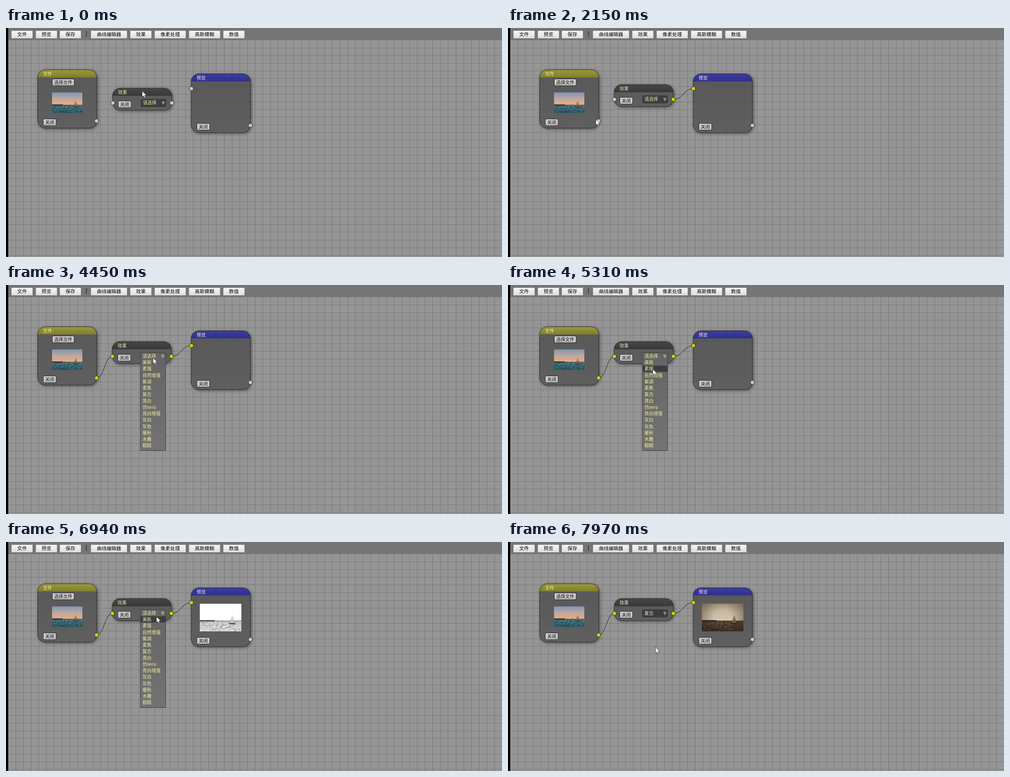
These frames come from a looping animation (1098x510 px, 8 s). An HTML page with a canvas:

```html
<!DOCTYPE html>
<html lang="zh">
<head>
<meta charset="utf-8">
<title>节点编辑器</title>
<style>
html, body { margin: 0; width: 100%; height: 100%; overflow: hidden; background: #959595; }
canvas { display: block; }
</style>
</head>
<body>
<canvas id="stage" width="1098" height="510"></canvas>
<script>
const ctx = document.getElementById('stage').getContext('2d');
const FONT = '"Noto Sans Mono CJK SC", "Noto Sans CJK SC", "Noto Sans CJK", sans-serif';
const LOOP = 8000;
const GRID = 17.1;
const ROW = 14.25;
const STEP = 145;
const OPTIONS = ['请选择', '美肤', '素描', '自然增强', '紫调', '柔焦', '复古', '黑白',
  '仿neru', '亮白增强', '灰白', '灰色', '暖秋', '木雕', '粗糙'];

// Pointer moves: start time, end time, destination.
const HOME = [301, 140];
const DRAG_END = 400;
const MOVES = [
  [130, DRAG_END, 300, 132], [540, 810, 383, 179], [950, 1090, 364, 158],
  [1210, 1480, 408, 136], [1880, 2150, 194, 203], [2270, 2420, 197, 206],
  [2700, 3610, 235, 159], [3890, 4310, 325, 162], [4890, 5310, 320, 187],
  [5960, 6200, 335, 157], [6940, 7450, 312, 242], [7720, 7970, 326, 234]
];

const LOOKS = {
  colour: { sky: ['#8196b4', '#bda9a0', '#ebab7c'], sea: ['#437480', '#24505c'],
    land: '#37363c', sail: '#75604f', waves: ['#173c4c', '#6f9598'], shade: 0 },
  sketch: { sky: ['#fff', '#fff'], sea: ['#c4c4c4', '#dcdcdc'],
    land: '#4a4a4a', sail: '#c2c2c2', waves: ['#666', '#fff'], shade: 0 },
  sepia: { sky: ['#b3a28c', '#cbbba4', '#d3c4ae'], sea: ['#564636', '#3a2e22'],
    land: '#30261d', sail: '#7a6752', waves: ['#241b13', '#857159'], shade: .45 }
};

function vertical(y, h, stops) {
  const g = ctx.createLinearGradient(0, y, 0, y + h);
  stops.forEach((c, i) => g.addColorStop(i / (stops.length - 1), c));
  return g;
}

function rect(x, y, w, h, fill) {
  ctx.fillStyle = fill;
  ctx.fillRect(x, y, w, h);
}

function stroke(colour, width = 1) {
  ctx.strokeStyle = colour;
  ctx.lineWidth = width;
  ctx.stroke();
}

function box(x, y, w, h, r, fill, border) {
  ctx.beginPath();
  ctx.roundRect(x, y, w, h, r);
  ctx.fillStyle = fill;
  ctx.fill();
  if (border) stroke(border);
}

function polygon(points, fill) {
  ctx.beginPath();
  points.forEach(p => ctx.lineTo(...p));
  ctx.closePath();
  ctx.fillStyle = fill;
  ctx.fill();
}

function text(str, x, midY, colour, align = 'left', size = 10) {
  ctx.font = `${size}px ${FONT}`;
  ctx.textAlign = align;
  ctx.fillStyle = colour;
  ctx.fillText(str, x, midY + size * .38);
}

function button(str, x, y) {
  const w = 8.5 + 10 * str.length;
  box(x + .5, y + .5, w, 15, 3, vertical(y, 15, ['#d2d2d2', '#c2c2c2']), '#1c1c1c');
  text(str, x + w / 2 + .5, y + 8, '#111', 'center');
}

function node(title, x, y, w, h, head, titleColour) {
  ctx.save();
  ctx.shadowColor = 'rgba(0,0,0,.5)';
  ctx.shadowBlur = 7;
  ctx.shadowOffsetX = ctx.shadowOffsetY = 2;
  box(x, y, w, h, GRID, vertical(y, h, ['#585858', '#5f5f5f']));
  ctx.restore();
  ctx.save();
  ctx.clip();
  rect(x, y, w, 17, vertical(y, 17, head));
  ctx.restore();
  box(x, y, w, h, GRID, 'transparent', '#282828');
  text(title, x + 12, y + 9.5, titleColour);
}

function port(x, y, on) {
  ctx.beginPath();
  ctx.arc(x, y, 4.4, 0, 7);
  ctx.fillStyle = on ? '#d2d200' : '#cbcbcb';
  ctx.fill();
  stroke('#222');
}

function wire(x1, y1, x2, y2) {
  const mid = (x1 + x2) / 2;
  ctx.beginPath();
  ctx.moveTo(x1, y1);
  ctx.bezierCurveTo(mid, y1, mid, y2, x2, y2);
  stroke('#333', 1.1);
}

function photo(x, y, w, h, look) {
  const horizon = y + h * .62, depth = h * .38;
  let seed = 7;
  const rnd = () => (seed = seed * 16807 % 2147483647) / 2147483647;
  rect(x, y, w, h, vertical(y, h * .62, look.sky));
  rect(x, horizon, w, depth, vertical(horizon, depth, look.sea));
  ctx.globalAlpha = .6;
  for (let i = 0; i < w * 4; i++) {
    const len = 1 + rnd() * 3;
    rect(x + rnd() * (w - len), horizon + rnd() * (depth - 1), len, .9, look.waves[i % 2]);
  }
  ctx.globalAlpha = 1;
  rect(x, horizon - 1.6, w * .36, 2.8, look.land);
  rect(x, horizon - .4, w, .9, look.land);
  const mast = x + w * .78, top = y + h * .41, foot = y + h * .7;
  for (const side of [-1, 1])
    polygon([[mast + side * .4, top], [mast + side * w * .055, foot], [mast + side * .4, foot]], look.sail);
  rect(mast - w * .07, foot, w * .15, h * .045, look.land);

  const g = ctx.createRadialGradient(x + w / 2, y + h / 2, h * .3, x + w / 2, y + h / 2, w * .6);
  g.addColorStop(0, 'rgba(40,28,16,0)');
  g.addColorStop(1, `rgba(40,28,16,${look.shade})`);
  rect(x, y, w, h, g);
}

function toolbar(x, labels) {
  for (const label of labels) {
    const pitch = 31.3 + 11.2 * label.length, w = Math.round(pitch - 7), left = Math.round(x);
    box(left + .5, 6.5, w - 1, 16, 0, vertical(6, 17, ['#f6f6f6', '#dedede']), '#d6d6d6');
    text(label, left + w / 2, 14, '#000', 'center', 10.7);
    x += pitch;
  }
}

function background() {
  rect(0, 0, 1098, 510, '#959595');
  for (let x = 20.8; x < 1098; x += GRID) rect(Math.round(x), 27, 1, 483, '#797979');
  for (let y = 44; y < 510; y += GRID) rect(5, Math.round(y), 1093, 1, '#797979');
  rect(0, 0, 1098, 27, '#757575');
  rect(0, 0, 5, 510, '#000');
  toolbar(12, ['文件', '预览', '保存']);
  toolbar(188, ['曲线编辑器', '效果', '像素处理', '高斯模糊', '数值']);
  rect(177.5, 7, 1, 12, '#111');
}

function arrowMark(x, y) {
  polygon([[x - 2.5, y - 2.5], [x + 2.5, y - 2.5], [x, y + 2.8]], 'transparent');
  stroke('#e8e89a');
}

function menu(x, y, pointerY) {
  box(x + .5, y + .5, 56, 218, 0, vertical(y, 218, ['#646464', '#737373']), '#424242');
  const hover = Math.round((pointerY - y - 8) / ROW);
  OPTIONS.forEach((label, i) => {
    const mid = y + 8 + i * ROW;
    if (i && i === hover) rect(x + 1, mid - 7, 56, 14, '#3b3e40');
    text(label, x + 5, mid, '#f0f09c');
  });
  arrowMark(x + 50, y + 9);
}

function pointer(x, y) {
  const shape = [[0, 0], [0, 13], [3, 10.3], [5.2, 15], [7.3, 14], [5.2, 9.6], [9.3, 9.3]];
  polygon(shape.map(([dx, dy]) => [x + .5 + dx, y + .5 + dy]), '#fff');
  stroke('#333', .8);
}

const ease = p => p * p * (3 - 2 * p);

// The pointer advances in discrete eased steps, as a screen recorder samples it.
function pointerAt(t) {
  let [x, y] = HOME;
  for (const [start, end, toX, toY] of MOVES) {
    if (t < start) break;
    const n = Math.round((end - start) / STEP);
    const k = Math.min(n, Math.floor((t - start) / (end - start) * n));
    const p = ease((k + 1) / (n + 1));
    x += (toX - x) * p;
    y += (toY - y) * p;
  }
  return [x, y];
}

function draw(t) {
  const [cx, cy] = pointerAt(t);
  const [gripX, gripY] = pointerAt(Math.min(t, DRAG_END));
  const ex = Math.round(gripX) - 65, ey = Math.round(gripY) - 6;
  const wiredOut = t >= 1480, wiredIn = t >= 3610;
  const dragOut = t >= 1210 && !wiredOut, dragIn = t >= 2700 && !wiredIn;
  const open = t >= 4450 && t < 5560 || t >= 6350 && t < 7570;
  const chosen = t < 5560 ? 0 : t < 7570 ? 2 : 6;

  background();
  node('文件', 70, 93, 131, 130, ['#9a9a38', '#7f7f2d'], '#f4f4c4');
  button('选择文件', 102, 113);
  button('关闭', 82, 202);
  photo(102, 143.5, 67, 45.5, LOOKS.colour);

  node('预览', 410, 102, 131, 131, ['#3c3ca0', '#30308c'], '#f2f2dc');
  button('关闭', 422, 212);
  if (chosen) photo(429, 137.5, 92, 61.5, chosen === 2 ? LOOKS.sketch : LOOKS.sepia);

  node('效果', ex, ey, 131, 49, ['#474747', '#383838'], '#eaeaae');
  button('关闭', ex + 12, ey + 28);
  box(ex + 62, ey + 24, 57, 18, 4, '#3b3e40');
  text(OPTIONS[chosen], ex + 67, ey + 32.5, '#f0f09c');
  arrowMark(ex + 112.3, ey + 33);

  if (wiredOut) wire(366, 159, 410.5, 135);
  else if (dragOut) wire(366, 159, cx, cy);
  if (wiredIn) wire(200.5, 207, 235.5, 159);
  else if (dragIn) wire(200.5, 207, cx, cy);

  port(200.5, 207, wiredIn || dragIn);
  port(ex + .5, ey + 33, wiredIn);
  port(ex + 131, ey + 33, wiredOut || dragOut);
  port(410.5, 135, wiredOut);
  port(541, 217, false);

  if (open) menu(297, 150, cy);
  pointer(cx, cy);
}

function tick() {
  draw(performance.now() % LOOP);
  requestAnimationFrame(tick);
}
tick();
</script>
</body>
</html>
```
